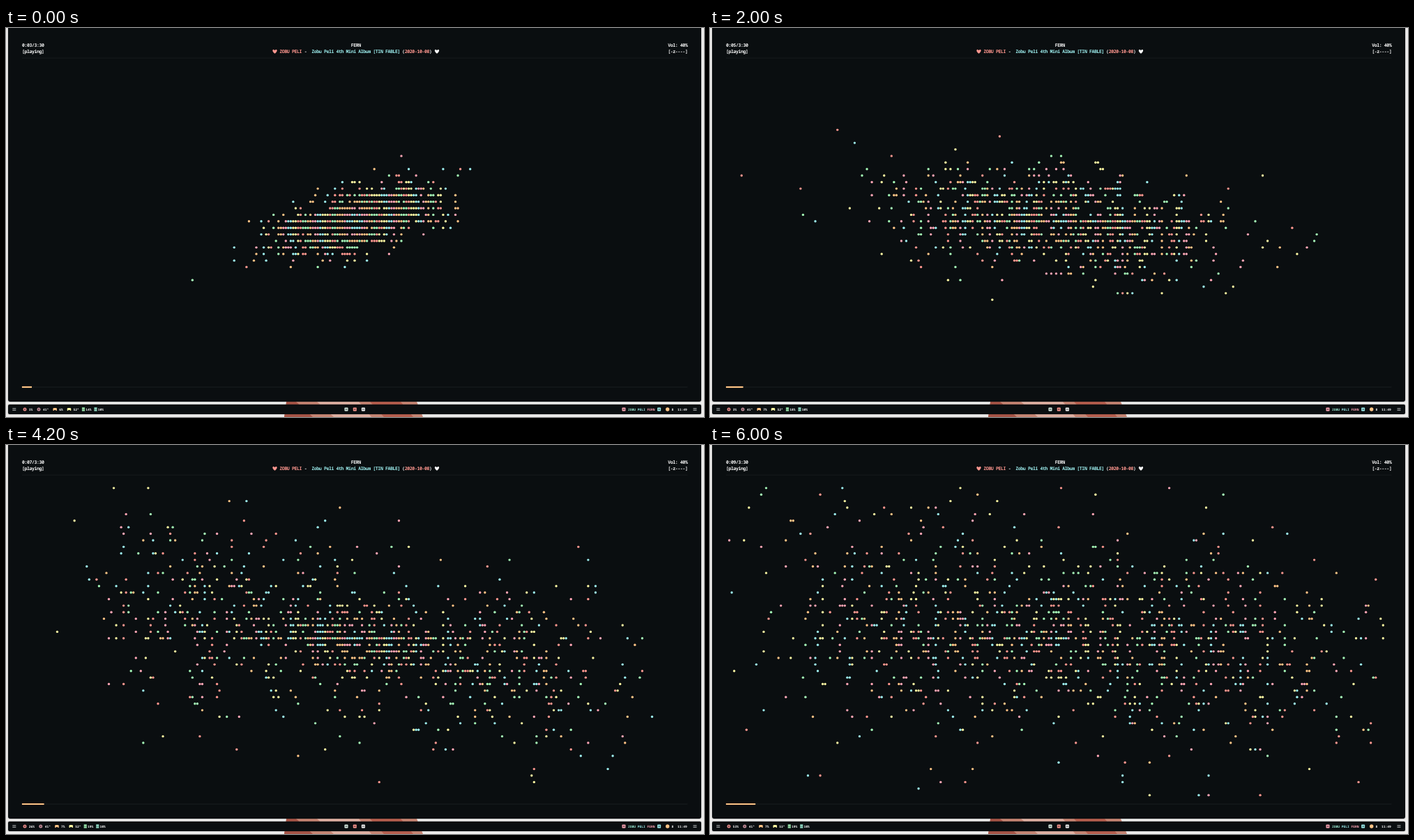
An HTML page with a canvas for the animation above (6100 ms loop, 1001 by 559 pixels).

```html
<!DOCTYPE html>
<html lang="en">
<head>
<meta charset="utf-8">
<title>Music visualizer</title>
<style>
  html, body { margin: 0; width: 100%; height: 100%; overflow: hidden; background: #efeeed; }
  canvas { display: block; }
</style>
</head>
<body>
<canvas id="stage" width="1001" height="559"></canvas>
<script>
const ctx = document.getElementById('stage').getContext('2d');

const LOOP = 6100;
const HELD_TICKS = [1, 26, 29, 46, 49, 53, 57];
const CELL_W = 3.525, CELL_H = 9.39, LEFT = 22.9, RIGHT = 977.4;
const CENTER_X = 500, CENTER_Y = 277.8;

const YELLOW = '#faf5a2', CYAN = '#9deeee', PINK = '#ffa6b6', PEACH = '#ffc486',
      GREEN = '#a5f7b7', SALMON = '#ff978f', WHITE = '#f6f6f6', DARK = '#0a0e10';
const RINGS = [YELLOW, CYAN, PINK, PEACH, GREEN, SALMON];

// Key moments of the music; core is the width of the dense middle in cells.
const MOMENTS = [
  { time: 0, loudness: 0.2, core: 17, tilt: -0.09 },
  { time: 1300, loudness: 0.12, core: 15, tilt: 0.02 },
  { time: 2000, loudness: 0.42, core: 36, tilt: 0.04 },
  { time: 2700, loudness: 0.8, core: 13, tilt: -0.07 },
  { time: 3600, loudness: 0.58, core: 7, tilt: -0.05 },
  { time: 4800, loudness: 1, core: 32, tilt: 0.165 },
  { time: LOOP, loudness: 0.86, core: 42, tilt: 0.02 }
];

function momentAt(time) {
  const next = Math.max(1, MOMENTS.findIndex(moment => moment.time >= time));
  const a = MOMENTS[next - 1], b = MOMENTS[next];
  const k = (time - a.time) / (b.time - a.time);
  const mix = key => a[key] + (b[key] - a[key]) * k;
  return { loudness: mix('loudness'), core: mix('core'), tilt: mix('tilt') };
}

function seededRandom(seed) {
  return () => {
    seed = (seed + 0x6D2B79F5) | 0;
    let n = Math.imul(seed ^ (seed >>> 15), 1 | seed);
    n = (n + Math.imul(n ^ (n >>> 7), 61 | n)) ^ n;
    return ((n ^ (n >>> 14)) >>> 0) / 4294967296;
  };
}

function rect(x, y, w, h, color, radius = 0) {
  ctx.fillStyle = color;
  ctx.beginPath();
  ctx.roundRect(x, y, w, h, radius);
  ctx.fill();
}

function disc(x, y, r, color) {
  ctx.fillStyle = color;
  ctx.beginPath();
  ctx.arc(x, y, r, 0, Math.PI * 2);
  ctx.fill();
}

function polygon(color, ...points) {
  ctx.fillStyle = color;
  ctx.beginPath();
  points.forEach(([x, y]) => ctx.lineTo(x, y));
  ctx.fill();
}

function setFont(size, spacing) {
  ctx.font = `bold ${size}px "Noto Sans Mono", monospace`;
  ctx.letterSpacing = spacing + 'px';
}

function text(string, x, y, color = WHITE, align = 'left') {
  ctx.fillStyle = color;
  ctx.textAlign = align;
  ctx.fillText(string, x, y);
}

function heart(x, y, color) {
  ctx.fillStyle = color;
  ctx.beginPath();
  ctx.moveTo(x, y + 3);
  ctx.bezierCurveTo(x - 6, y - 1.5, x - 2, y - 4.8, x, y - 1.6);
  ctx.bezierCurveTo(x + 2, y - 4.8, x + 6, y - 1.5, x, y + 3);
  ctx.fill();
}

function drawDesktop() {
  rect(0, 0, 1001, 559, '#efeeed');
  polygon('#c98775', [403, 537], [589, 537], [598, 559], [399, 559]);
  polygon('#a95648', [402, 537], [416, 537], [440, 559], [399, 559]);
  polygon('#e2b3a5', [446, 537], [506, 537], [524, 559], [470, 559]);
  polygon('#b9604f', [522, 537], [566, 537], [584, 559], [542, 559]);

  ctx.shadowColor = 'rgba(0,0,0,.25)';
  ctx.shadowBlur = 3;
  rect(3, -4, 994, 541, DARK, 3);
  rect(3, 541, 994, 14, DARK, 2);
  ctx.shadowBlur = 0;
}

function drawPlayer(seconds) {
  setFont(6.6, -0.435);
  text(`0:0${seconds}/3:30`, LEFT, 26.8);
  text('[playing]', LEFT, 36.2);
  text('Vol: 40%', RIGHT, 26.8, WHITE, 'right');
  text('[-z----]', RIGHT, 36.2, WHITE, 'right');
  text('FERN', 501.7, 26.8, WHITE, 'center');

  heart(385.5, 33.8, SALMON);
  text('ZOBU PELI', 392.3, 36.2, SALMON);
  text('-', 427.8, 36.2);
  text('Zobu Peli 4th Mini Album [TIN FABLE]', 438.3, 36.2, CYAN);
  text('(', 568, 36.2);
  text('2020-10-08', 571.8, 36.2, SALMON);
  text(')', 607, 36.2);
  heart(618, 33.8, WHITE);

  rect(LEFT, 42.8, RIGHT - LEFT, 0.8, '#191e20');
  rect(LEFT, 515.6, RIGHT - LEFT, 0.8, '#191e20');
  rect(LEFT, 514.9, Math.ceil(seconds * 270 / 210) * CELL_W, 2.2, PEACH);
}

// Left channel drives x, right channel drives y; colour follows rings two cells wide.
function drawSound(time) {
  const { loudness, core, tilt } = momentAt(time);
  const power = loudness ** 2;
  const random = seededRandom(time * 31 + 7);
  const gauss = () => Math.sqrt(-2 * Math.log(1 - random())) * Math.cos(2 * Math.PI * random());
  const wave = () => 1.3 * Math.sin(2 * Math.PI * random()) + 0.4 * gauss();
  const cells = new Map();

  function scatter(count, width, height, spread) {
    for (let i = 0; i < count; i++) {
      const x = spread() * width;
      const y = Math.max(-23, Math.min(24, gauss() * height + x * tilt));
      if (Math.abs(x) >= 135) continue;
      const ring = Math.floor(Math.hypot(x, 2 * y) / 2) % RINGS.length;
      cells.set(Math.trunc(x) + ',' + Math.trunc(y), RINGS[ring]);
    }
  }
  scatter(150 + 1000 * (1 - loudness), core, 1 + 0.09 * core, gauss);
  scatter(100 + 1100 * power, 20 + 60 * power, (2.5 + 10 * power) * (1 - 3 * Math.abs(tilt)), wave);

  for (const [cell, color] of cells) {
    const [column, row] = cell.split(',').map(Number);
    disc(CENTER_X + column * CELL_W, CENTER_Y + row * CELL_H, 1.7, color);
  }
}

function menuIcon(x) {
  for (const dy of [-1.6, 0, 1.6]) rect(x - 2.5, 547.7 + dy, 5, 0.7, '#b9bcbc');
}

function chipIcon(x, color) {
  disc(x, 548, 2.5, color);
  disc(x, 548, 1, '#5a3a40');
}

function gamepadIcon(x, color) {
  rect(x - 2.8, 546, 5.6, 3, color, 1.4);
  disc(x - 2, 549, 0.9, color);
  disc(x + 2, 549, 0.9, color);
}

function diskIcon(x, color) {
  for (const dy of [0, 1.9, 3.8]) rect(x - 2.2, 545.2 + dy, 4.4, 1.5, color, 0.6);
}

function tileIcon(x, color) {
  rect(x - 2.5, 545.5, 5, 5, color, 0.8);
  rect(x - 1.2, 547.2, 0.9, 1.6, DARK);
  rect(x + 0.4, 547.2, 0.9, 1.6, DARK);
}

function drawStatusBar(time) {
  const cpu = time < 1200 ? 1 : time < 3300 ? 3 : time < 5900 ? 26 : 53;
  const gpu = time < 500 ? 6 : 7;
  const heat = time < 5900 ? 52 : 53;
  const memory = time < 500 ? 14 : time < 3300 ? 18 : 19;
  const shift = cpu > 9 ? 2.76 : 0;

  setFont(4.6, 0);
  const label = (string, x, color) => text(string, x, 549.7, color);

  menuIcon(11.8);
  chipIcon(27, '#e68a86');
  label(cpu + '%', 32.7);
  ctx.save();
  ctx.translate(shift, 0);
  chipIcon(47, '#c08d98');
  label('41°', 53);
  gamepadIcon(70.2, PEACH);
  label(gpu + '%', 76.2);
  gamepadIcon(90.5, YELLOW);
  label(heat + '°', 96.4);
  diskIcon(111, GREEN);
  label(memory + '%', 114.2);
  diskIcon(128.5, '#9decd4');
  label('10%', 131.8);
  ctx.restore();

  tileIcon(488, '#dcefe6');
  tileIcon(500.3, SALMON);
  tileIcon(512.4, WHITE);

  tileIcon(886, PINK);
  label('ZOBU', 892, '#9decd4');
  label('PELI', 905.8, CYAN);
  label('FERN', 919.6, PINK);
  tileIcon(936.6, CYAN);
  disc(948.7, 548, 2.7, PEACH);
  label('8', 954.6);
  label('11:49', 963);
  menuIcon(988);
}

let shownTick = -1;

function render(time) {
  let tick = Math.floor(time / 100);
  if (HELD_TICKS.includes(tick)) tick--;
  if (tick === shownTick) return;
  shownTick = tick;

  const now = tick * 100;
  drawDesktop();
  drawPlayer(3 + Math.floor((now + 300) / 1000));
  drawSound(now);
  drawStatusBar(now);
}

ctx.textRendering = 'geometricPrecision';
let start;
function loop(now) {
  start ??= now;
  render((now - start) % LOOP);
  requestAnimationFrame(loop);
}
requestAnimationFrame(loop);
</script>
</body>
</html>
```
